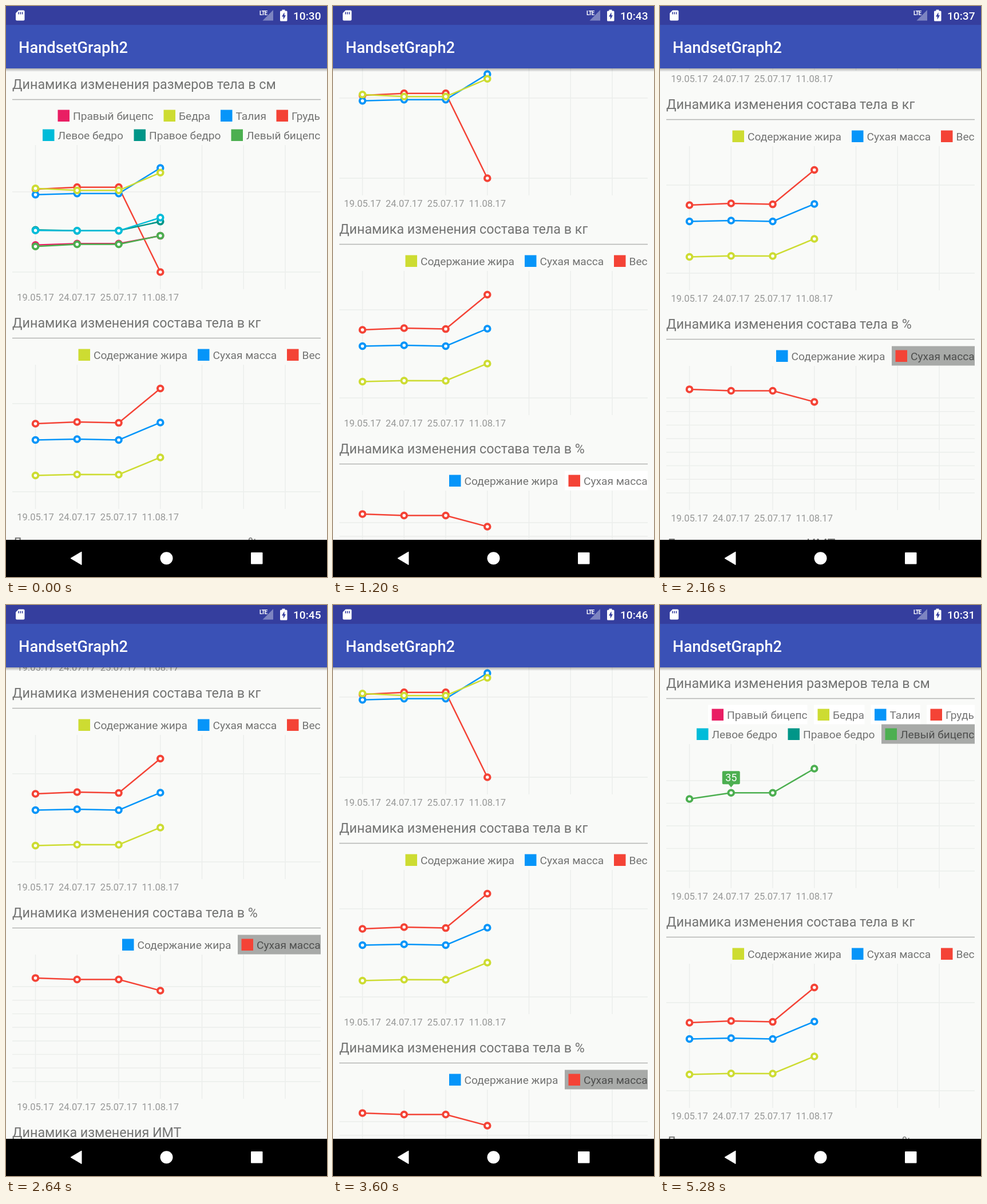
Recreate the animation shown at these times as an HTML page. Size 561 px wide and 998 px high, loop 5.52 s.

```html
<!DOCTYPE html>
<html lang="ru">
<head>
<meta charset="utf-8">
<title>Charts</title>
<style>
html, body { margin: 0; width: 100%; height: 100%; overflow: hidden; background: #f9faf8; }
svg { display: block; width: 100vw; height: 100vh; }
text { font-family: Roboto, sans-serif; }
.head { font-size: 23.3px; fill: rgba(0,0,0,.54); }
.key { font-size: 19.15px; fill: rgba(0,0,0,.54); }
.date { font-size: 16.5px; fill: #979897; text-anchor: middle; }
.tip { font-size: 18px; fill: #fff; text-anchor: middle; }
.grid { stroke: #eceeec; stroke-width: 1.5; fill: none; }
.rule { stroke: #b3b4b2; stroke-width: 1.5; }
</style>
</head>
<body>
<svg viewBox="0 0 561 998" xmlns="http://www.w3.org/2000/svg">
  <defs>
    <linearGradient id="shade" x1="0" y1="0" x2="0" y2="1">
      <stop offset="0" stop-color="#000" stop-opacity=".3"/>
      <stop offset="1" stop-color="#000" stop-opacity="0"/>
    </linearGradient>
  </defs>
  <rect width="561" height="998" fill="#f9faf8"/>
  <g id="page"></g>
  <rect y="109" width="561" height="6" fill="url(#shade)"/>
  <rect width="561" height="109" fill="#3a51b6"/>
  <rect width="561" height="33" fill="#353e9e"/>
  <path d="M22 7.500h8.500q2 0 2 2v14q0 2-2 2h-11.500q-2 0-2-2v-11z" fill="#fff"/>
  <path d="M22 10.500v4M25.300 10.500v4M28.600 10.500v4" stroke="#353e9e" stroke-width="1.600"/>
  <path d="M467 7v18.500h-18.500z" fill="#7d84c1"/>
  <text x="443" y="16.300" font-size="10" font-weight="700" fill="#fff" letter-spacing="-1">LTE</text>
  <path d="M482.500 8.500v-2h5v2h2.500q1.500 0 1.500 1.500v15q0 1.500-1.500 1.500h-9.500q-1.500 0-1.500-1.500v-15q0-1.500 1.500-1.500z" fill="#fff"/>
  <path d="M486.500 11l-4.500 7.500h2.700v5.200l4.300-7.400h-2.500z" fill="#353e9e"/>
  <text id="clock" x="550.500" y="24" font-size="19.100" font-weight="500" fill="#fff" text-anchor="end"></text>
  <text x="22" y="81.500" font-size="27.270" font-weight="500" fill="#fff">HandsetGraph2</text>
  <rect y="933" width="561" height="65" fill="#000"/>
  <path d="M113 965.300L132 954v22.600z" fill="#fff" stroke="#fff" stroke-linejoin="round"/>
  <circle cx="280.500" cy="965.200" r="11" fill="#fff"/>
  <rect x="428" y="955" width="20.500" height="20.500" rx="1" fill="#fff"/>
</svg>
<script>
const RED = '#f44336', BLUE = '#0695f9', LIME = '#cddc32', PINK = '#e91e63',
      GREEN = '#4caf50', TEAL = '#009688', CYAN = '#00bcd9';
const DATES = ['19.05.17', '24.07.17', '25.07.17', '11.08.17'];
const HEAD = 'Динамика изменения ';
const STEP = 240;

// series: name, colour, values, legend box left and right, legend row
const CHARTS = [
  { title: 'размеров тела в см', zero: 465, rows: 2, series: [
    ['Грудь', RED, [103.2, 105.7, 105.7, 0], 466, 550, 1],
    ['Талия', BLUE, [96.4, 97.8, 97.8, 129.7], 368.5, 455, 1],
    ['Бедра', LIME, [104.2, 101.7, 101.7, 123.8], 269, 357.5, 1],
    ['Правый бицепс', PINK, [33.6, 35.4, 35.4, 45.2], 84, 257.5, 1],
    ['Левый бицепс', GREEN, [31.9, 34.6, 34.6, 45.3], 387, 550, 0],
    ['Правое бедро', TEAL, [52.5, 51.4, 51.7, 62.9], 217, 376, 0],
    ['Левое бедро', CYAN, [51.8, 51.4, 51.4, 67.8], 57.5, 206, 0]] },
  { title: 'состава тела в кг', zero: 849, rows: 1, k: 1.54, series: [
    ['Вес', RED, [77.3, 79.2, 78.2, 117.2], 484.500, 550, 0],
    ['Сухая масса', BLUE, [58.8, 59.7, 58.8, 78.6], 328.500, 473, 0],
    ['Содержание жира', LIME, [18.5, 19.6, 19.5, 39], 120, 317, 0]] },
  { title: 'состава тела в %', zero: 1233, rows: 1, k: 2.37, series: [
    ['Сухая масса', RED, [76.4, 75.3, 75.3, 67.1], 405, 550, 0],
    ['Содержание жира', BLUE, [23.6, 24.7, 24.7, 32.9], 196.500, 394, 0]] }
];

// legend marks: g = chosen, w = released, . = untouched
const step = (clock, scroll, size = '', share = '', more = {}) =>
  ({ clock, scroll, marks: [size, '', share], phase: 1, ...more });
const bars = true;
const STEPS = [
  step('10:30', 0),
  step('10:31', 0, 'g', '', { bars }),
  step('10:30', 0, 'gg', '', { bars, phase: .04 }),
  step('10:30', 0, 'ggg', '', { bars }),
  step('10:42', 155, 'ggg'),
  ...[164, 382, 174, 260].map(y => step('10:43', y, 'ggg', 'w')),
  step('10:37', 382, 'ggg', 'g'),
  ...[300, 400].map(y => step('10:45', y, 'ggg', 'g')),
  ...[310, 261, 212, 164, 190].map(y => step('10:46', y, 'ggg', 'g')),
  step('10:38', 0, 'gggww'),
  step('10:38', 0, 'wggww'),
  step('10:31', 0, 'wgwwg', '', { bars }),
  step('10:31', 0, 'wwwwg', '', { bars }),
  step('10:31', 0, 'wwwgg', '', { tip: 3 }),
  step('10:31', 0, 'wwwwg', '', { tip: 1 })
];

const colX = i => 51.5 + 72.75 * i;
const rect = (x, y, w, h, fill) => `<rect x="${x}" y="${y}" width="${w}" height="${h}" fill="${fill}"/>`;
const text = (cls, x, y, s) => `<text class="${cls}" x="${x}" y="${y}">${s}</text>`;

function legendItem([name, color, , left, right, row], zero, mark) {
  const top = zero - 256 - 34 * row;
  const fill = { g: '#a8aaa8', w: '#fff' }[mark];
  return (fill ? rect(left, top - .5, right - left, 34, fill) : '') +
    rect(left + 6.5, top + 6.5, 20.5, 20.5, color) +
    text('key', left + 33, top + 24, name);
}

function curve(color, points) {
  return `<polyline points="${points.join(' ')}" fill="none" stroke="${color}" stroke-width="2.5"/>` +
    points.map(([x, y]) =>
      `<circle cx="${x}" cy="${y}" r="4.8" fill="#fff" stroke="${color}" stroke-width="4"/>`).join('');
}

function tipBox(x, y, value) {
  return `<path d="M${x - 13.5} ${y - 38}h27q2 0 2 2v19q0 2-2 2h-9l-4.500 5.500l-4.500-5.500h-9q-2 0-2-2v-19q0-2 2-2z" fill="${GREEN}"/>` +
    text('tip', x, y - 20.2, Math.round(value));
}

function chart(c, marks, state, first) {
  const { zero, rows, series } = c;
  const headY = zero - 295 - 33 * (rows - 1);
  const chosen = series.filter((s, i) => marks[i] === 'g');
  const shown = chosen.length ? chosen : series;
  const max = Math.max(...shown.flatMap(s => s[2]));
  const k = c.k || (177.4 + .0355 * max) / max;
  const gap = k > 1.6 ? 10 : 100;
  const place = (v, i) => [colX(i), zero - v * k * state.phaseOf];

  let grid = '';
  for (let i = 0; i < 7; i++) grid += `M${colX(i)} ${zero - 222}v252`;
  for (let v = 0; v <= max; v += gap) grid += `M11 ${zero - v * k}h539`;

  let out = text('head', 11, headY + 8.3, HEAD + c.title) +
    `<path class="rule" d="M11 ${headY + 26.5}h539"/>` +
    series.map((s, i) => legendItem(s, zero, marks[i])).join('') +
    `<path class="grid" d="${grid}"/>` +
    DATES.map((d, i) => text('date', colX(i), zero + 50.2, d)).join('') +
    shown.map(s => curve(s[1], s[2].map(place))).join('');

  if (first && state.tip) {
    const v = series[4][2][state.tip];
    out += tipBox(...place(v, state.tip), v);
  }
  if (state.bars) out += rect(11, zero + 44.7, 492.5, 5.8, 'rgba(140,141,140,.65)');
  return out;
}

const page = document.getElementById('page');
const clock = document.getElementById('clock');
let last = -1;

function draw(ms) {
  const n = Math.floor(ms / STEP) % STEPS.length;
  if (n === last) return;
  last = n;
  const s = STEPS[n];
  clock.textContent = s.clock;
  page.setAttribute('transform', `translate(0 ${-s.scroll})`);
  page.innerHTML = CHARTS.map((c, i) =>
    chart(c, s.marks[i], { ...s, phaseOf: i ? 1 : s.phase }, i === 0)).join('') +
    text('head', 11, 1330.3, HEAD + 'ИМТ');
}

const start = performance.now();
(function tick() {
  draw(performance.now() - start);
  requestAnimationFrame(tick);
})();
</script>
</body>
</html>
```
